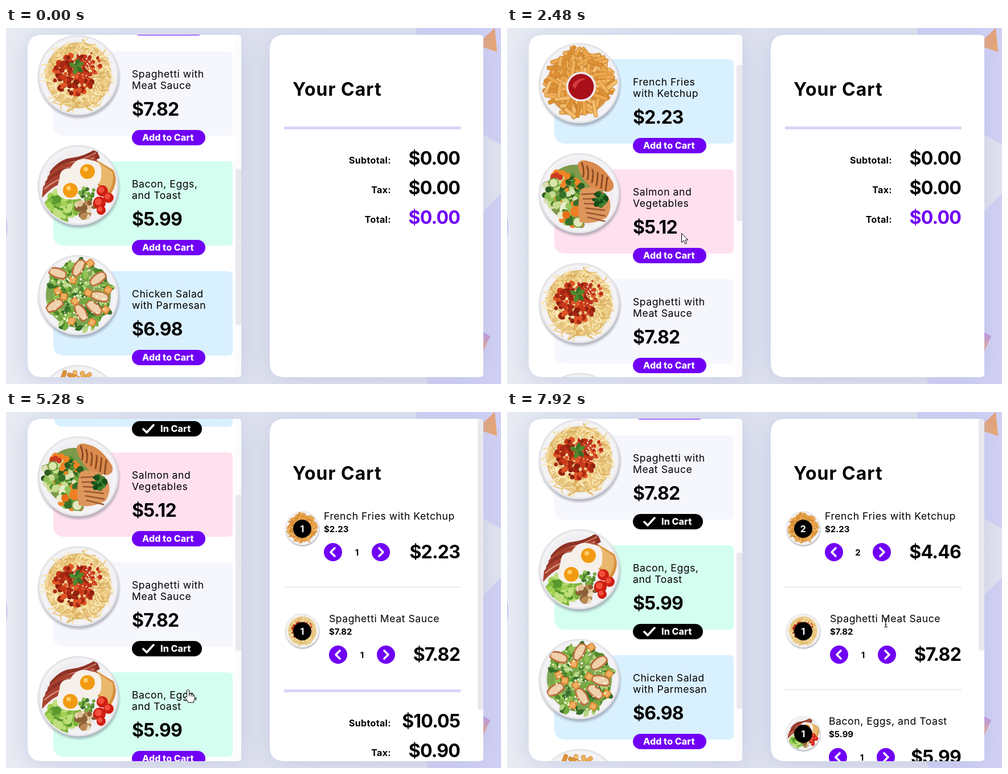
An HTML page for the animation above (8000 ms loop, 869 px wide and 625 px high).

```html
<!DOCTYPE html>
<html lang="en">
<head>
<meta charset="utf-8">
<title>Food cart</title>
<style>
  html, body { margin: 0; width: 100%; height: 100%; overflow: hidden; background: #e3e6f0; }
  svg { display: block; width: 869px; height: 625px; }
  text { font-family: Inter, Roboto, sans-serif; font-weight: 700; font-size: 16px; letter-spacing: .35px; }
  .name { font-weight: 400; font-size: 17.6px; letter-spacing: .55px; }
  .price { font-size: 32px; letter-spacing: -.8px; }
  .title { font-size: 32px; letter-spacing: 1px; }
  .button { font-weight: 800; letter-spacing: .1px; fill: #fff; }
  .small { font-size: 15px; letter-spacing: 0; }
  .end { text-anchor: end; }
  .mid { text-anchor: middle; }
  .panel { fill: #fff; filter: drop-shadow(0 4px 22px #b4bcdc99); }
  .tick { fill: none; stroke: #fff; stroke-width: 3.6; stroke-linecap: round; stroke-linejoin: round; }
</style>
</head>
<body>
<svg id="stage" viewBox="0 0 869 625"></svg>
<script>
const PURPLE = '#7000f5', LOOP = 8000, TICK = 40, PITCH = 193;
const stage = document.getElementById('stage');

let seed = 7;
const rnd = () => (seed = (seed * 16807) % 2147483647) / 2147483647;
const span = (a, b) => a + (b - a) * rnd();
const pick = list => list[Math.floor(rnd() * list.length)];
const many = (n, fn) => Array.from({ length: n }, (_, i) => fn(i)).join('');
const polar = r => {
  const a = span(0, 2 * Math.PI), d = r * Math.sqrt(rnd());
  return [d * Math.cos(a), d * Math.sin(a), a];
};

const circle = (x, y, r, fill, more = '') => `<circle cx="${x}" cy="${y}" r="${r}" fill="${fill}" ${more}/>`;
const rect = (x, y, w, h, r, fill, more = '') =>
  `<rect x="${x}" y="${y}" width="${w}" height="${h}" rx="${r}" fill="${fill}" ${more}/>`;
const path = (d, fill, more = '') => `<path d="${d}" fill="${fill}" ${more}/>`;
const line = (d, color, width) => path(d, 'none', `stroke="${color}" stroke-width="${width}"`);
const text = (x, y, cls, str, more = '') => `<text x="${x}" y="${y}" class="${cls}" ${more}>${str}</text>`;
const group = (x, y, body, more = '') => `<g transform="translate(${x} ${y})" ${more}>${body}</g>`;
const turn = (x, y, deg, body) => `<g transform="translate(${x} ${y}) rotate(${deg})">${body}</g>`;
const money = v => '$' + v.toFixed(2);

// Rounded box with large left and small right corners
const slab = (x, y, w, h, a, b) =>
  `M${x + a} ${y}h${w - a - b}q${b} 0 ${b} ${b}v${h - 2 * b}q0 ${b} ${-b} ${b}h${a + b - w}` +
  `q${-a} 0 ${-a} ${-a}v${2 * a - h}q0 ${-a} ${a} ${-a}z`;

const dots = (n, x, y, spread, r0, r1, colors) => many(n, () => {
  const [dx, dy] = polar(spread);
  return circle((x + dx).toFixed(1), (y + dy).toFixed(1), span(r0, r1).toFixed(1), pick(colors));
});
const sticks = n => many(n, () => {
  const [x, y, a] = polar(56);
  return turn(x, y, a * 57.3 + span(-70, 70), rect(-15, -3.4, span(24, 32), 6.8, 2,
    pick(['#eda84d', '#f3bd6d', '#dd9135', '#f0b25c']), 'stroke="#bf7424" stroke-width=".7"'));
});

const GREENS = ['#4f8a2c', '#74ab3e', '#93c257', '#37702a'];
const leaf = (x, y, deg, len, fill) =>
  turn(x, y, deg, path(`M0 0Q${len / 2} ${-len * .6} ${len} 0Q${len / 2} ${len * .5} 0 0z`, fill));

const foods = {
  fries: () => circle(0, 0, 56, '#d9933f') + sticks(120) + circle(3, 6, 26, '#eeeaf0') + circle(3, 6, 22.5, '#a90f19') +
    path('M-13 4Q-3 -12 13 -8Q-2 -5 -7 10z', '#d33a3d'),

  salmon: () => circle(-8, 0, 50, '#7d9a4c') +
    dots(120, -28, -4, 34, 3, 7, [...GREENS, '#2c5c22', '#c8dc8f', '#f08424', '#d9e0b4']) +
    dots(45, -10, 38, 23, 4, 8, [...GREENS, '#f2862b', '#e6edc8']) +
    dots(4, -38, -24, 15, 4, 6, ['#cc3a22']) +
    circle(-45, -18, 9, '#6f9e3f') + circle(-45, -18, 7, '#dbe6ad') +
    circle(-2, 51, 10, '#6f9e3f') + circle(-2, 51, 8, '#e0e9bd') +
    circle(-6, 32, 10, '#f07e24') + circle(-23, 38, 7, '#e96e17') +
    path('M-3 -50Q0 -64 28 -52Q46 -42 59 -19Q64 -6 50 -2L20 -10Q0 -28 -3 -50z', '#d98a4c') +
    many(6, i => line(`M${4 + i * 9} ${-54 + i * 6}Q${10 + i * 8} -38 ${6 + i * 8} ${-28 + i * 5}`, '#8d4a22', 3)) +
    path('M4 -8Q28 -16 50 5Q60 23 48 43Q22 56 1 51Q-6 20 4 -8z', '#dd965c') +
    many(6, i => line(`M${4 + i * 2} ${2 + i * 8}l${38 - i} ${-2 + i * 2}`, '#9a5730', 2.6)) +
    dots(34, 35, 10, 12, 2, 5, ['#286321', '#3b832e', '#164d19']),

  spaghetti: () => circle(0, 0, 58, '#e3c07a') + many(260, () => {
    const [x, y] = polar(57), v = () => span(-20, 20).toFixed(1);
    return line(`M${x.toFixed(1)} ${y.toFixed(1)}q${v()} ${v()} ${v()} ${v()}`,
      pick(['#edcb83', '#f6df9f', '#d9ae5c', '#fbebbd']), 2.2);
  }) + dots(150, -7, -2, 36, 2, 5.5, ['#c8391a', '#a92813', '#e05325', '#8d210f']) +
    dots(50, 17, -17, 24, 1.5, 4, ['#c8391a', '#b52d15', '#df5a2b']) +
    dots(40, 15, -23, 27, .7, 1.7, ['#faeee0']) +
    [205, 285, 330, 45, 110].map((a, i) => leaf(-3, -15, a, 15, GREENS[i % 2 * 3])).join(''),

  bacon: () => path('M29 -46L64 -25Q71 0 53 20L18 -17z', '#d8923f') + path('M34 -41L60 -23Q64 -2 52 12L24 -16z', '#e9b86d') +
    [0, 1, 2, 3].map(i => group(i * -4, i * 9, path('M-50 -24Q-33 -46 -12 -48T31 -64L38 -48Q10 -33 -11 -31T-52 -4z', i % 2 ? '#a8412f' : '#8f3225') +
      line('M-48 -20Q-30 -36 -11 -40T31 -57', '#d18d79', 2.4))).join('') +
    dots(120, -27, 36, 27, 3, 8, ['#7fb83d', '#a2d153', '#5a9a2d', '#bfdf7c']) +
    path('M-33 -12Q-33 -30 -14 -30Q-2 -52 22 -44Q43 -42 40 -20Q42 1 20 5Q13 27 -13 25Q-41 24 -37 3z', '#f6f0ea') +
    circle(16, -24, 13, '#f29b12') + circle(13, -28, 4, '#ffce66') +
    circle(-14, 9, 13, '#f29b12') + circle(-17, 5, 4, '#ffce66') +
    dots(30, 14, 41, 16, 3, 7, ['#b98a54', '#dfc296', '#8b6036', '#ead9ba']) +
    dots(24, 16, 15, 13, 2, 4, GREENS) +
    [[42, 10, 10], [37, 31, 11], [53, 22, 9], [40, 44, 8]].map(([x, y, r]) =>
      circle(x, y, r, '#cf1f14') + circle(x - 2, y - 2, r * .55, '#f2503b')).join(''),

  chicken: () => circle(0, 0, 57, '#7da551') + many(220, () => {
    const [x, y, a] = polar(57);
    return leaf(x, y, a * 57.3 + span(0, 180), span(9, 18), pick([...GREENS, '#b4d581']));
  }) + [[-36, -39, 20], [0, -48, -60], [34, -29, -35], [-42, 18, -30], [28, 22, 40], [5, 30, 60], [38, 2, 15]].map(([x, y, a]) =>
    turn(x, y, a, path('M-16 -4Q-5 -13 13 -7Q20 1 14 8Q-4 13 -16 6z', '#b8713f') +
      path('M-14 -2Q-4 -9 11 -5Q17 1 12 5Q-3 9 -14 4z', '#efd0ab'))).join('') +
    [[-10, -27], [21, -57], [-26, 2], [17, -5], [-12, 45], [52, -10], [-6, 10], [-36, -8], [24, 47], [48, 25]].map(([x, y]) =>
      turn(x, y, span(0, 90), rect(-6, -6, 13, 13, 2, '#d9832f') + rect(-4, -4, 9, 9, 1, '#efb063'))).join('') +
    dots(80, 0, 0, 55, .8, 2, ['#f6f2d9']),

  sides: () => sticks(70)
};

const menu = [
  ['fries', 'French Fries', 'with Ketchup', 2.23, '#d9f0ff'],
  ['salmon', 'Salmon and', 'Vegetables', 5.12, '#ffe0ef'],
  ['spaghetti', 'Spaghetti with', 'Meat Sauce', 7.82, '#f6f7fd'],
  ['bacon', 'Bacon, Eggs,', 'and Toast', 5.99, '#d4fff0'],
  ['chicken', 'Chicken Salad', 'with Parmesan', 6.98, '#d9f0ff']
];

// food, cart label, price, left shift, time added
const cart = [
  ['fries', 'French Fries with Ketchup', 2.23, 0, 3040],
  ['spaghetti', 'Spaghetti Meat Sauce', 7.82, 9, 4880],
  ['bacon', 'Bacon, Eggs, and Toast', 5.99, 7, 6880]
];
const SECOND_FRIES = 7520;

const use = id => `<use href="#${id}"/>`;
const plate = (id, draw) => `<g id="${id}">` + circle(1, 4, 74, 'url(#shade)') +
  circle(0, 0, 70.5, 'url(#china)') + `<g clip-path="url(#dish)">${draw()}</g></g>`;

const menuItem = ([id, a, b, price, color], i) => group(0, i * PITCH,
  path(slab(83, 0, 315, 148, 20, 8), color) + group(127, 42, use(id)) +
  text(221, 46, 'name', a) + text(221, 66, 'name', b) + text(221, 113, 'price', money(price)) +
  `<g id="add-${id}">` + rect(221, 138, 129, 27, 13.5, PURPLE) + text(239, 157, 'button', 'Add to Cart') + '</g>' +
  `<g id="in-${id}">` + rect(221, 138, 123, 27, 13.5, '#000') + path('M241 152l6 6 12-13', 'none', 'class="tick"') +
  text(271, 157, 'button', 'In Cart') + '</g>');

const arrow = (x, dir, id) => group(x, 246, circle(0, 0, 16, PURPLE, `id="${id}"`) +
  path(`M${-3 * dir} -7l${7 * dir} 7l${-7 * dir} 7`, 'none', 'class="tick"'));

const cartItem = ([id, label, price, dx], i) => group(0, i * 180,
  `<g transform="translate(520 204) scale(.425)">${use(id)}</g>` + circle(520, 205, 16, '#000') +
  text(520, 210.5, 'mid', 1, `fill="#fff" id="badge${i}"`) +
  text(558 + dx, 189, 'name', label) + text(558 + dx, 211, 'small', money(price)) +
  arrow(574 + dx, -1, 'less' + i) + text(616 + dx, 251.5, 'mid small', 1, `id="qty${i}"`) + arrow(658 + dx, 1, 'more' + i) +
  text(797, 257, 'price end', money(price), `id="sum${i}"`) +
  (i ? rect(488, 127, 310, 1, 0, '#d9d9dc') : ''), `id="row${i}"`);

const sumLine = (y, label, id, color) =>
  text(676, y - 2, 'end', label) + text(797, y, 'price end', '$0.00', `id="${id}" fill="${color}"`);

const pointer = {
  arrow: path('M.5 .5V16.5L4.3 13L7 19L9.6 17.8L7 12H12z', '#fff', 'stroke="#000"'),
  hand: path('M-1.5 1.5Q.5 -1 2.5 1.5V8Q5 6.5 6 8.7Q8.5 7.5 9.3 9.8Q11.8 9 12 12V17Q11.5 20 10 23H1Q-1 19 -5 14Q-5 11 -1.5 13.5z', '#fff', 'stroke="#000"') +
    line('M2.5 8v4M6 9v3.5M9.3 10v3', '#000', 1),
  beam: line('M-3 -7.5h2.5l.5 .5l.5 -.5h2.5M0 -7V7M-3 7.5h2.5l.5 -.5l.5 .5h2.5M-1.5 3h3', '#111', 1.2)
};

stage.innerHTML = `<defs>
  <linearGradient id="sky"><stop stop-color="#e9ecf3"/><stop offset=".5" stop-color="#dfe2ef"/><stop offset="1" stop-color="#e2e4ef"/></linearGradient>
  <linearGradient id="clay" x2="1" y2="1"><stop stop-color="#dd9c8e"/><stop offset="1" stop-color="#eaa563"/></linearGradient>
  <linearGradient id="dusk" x2="0" y2="1"><stop offset=".1" stop-color="#b78af0"/><stop offset=".5" stop-color="#e39c86"/></linearGradient>
  <radialGradient id="china"><stop offset=".8" stop-color="#efedf0"/><stop offset=".93" stop-color="#f5f4f6"/><stop offset="1" stop-color="#dedde2"/></radialGradient>
  <radialGradient id="shade"><stop offset=".9" stop-color="#777a88" stop-opacity=".6"/><stop offset="1" stop-color="#777a88" stop-opacity="0"/></radialGradient>
  <clipPath id="dish">${circle(0, 0, 67, '#000')}</clipPath>
  <clipPath id="left"><path d="${slab(38, 12, 375, 601, 26, 7)}"/></clipPath>
  <clipPath id="right"><path d="${slab(463, 12, 375, 601, 26, 7)}"/></clipPath>
  ${Object.entries(foods).map(([id, draw]) => plate(id, draw)).join('')}
</defs>` +
  rect(0, 0, 869, 625, 0, 'url(#sky)') +
  path('M720 0H869V205L800 165Q722 80 720 0zM869 290L780 382V540L736 613L741 625H869z', '#d1d0f5') +
  circle(-57, 350, 60, '#cfcff5') +
  path('M826 30L858 0L862 42z', 'url(#clay)') +
  path('M830 530L850 541L830 585z', 'url(#dusk)') +
  path(slab(38, 12, 375, 601, 26, 7), '#fff', 'class="panel"') +
  path(slab(463, 12, 375, 601, 26, 7), '#fff', 'class="panel"') +
  '<g clip-path="url(#left)">' + rect(401, 12, 12, 601, 0, '#fcfcfd') +
  `<g id="menu">${menu.map(menuItem).join('')}${group(127, 5 * PITCH + 42, use('sides'))}</g>` +
  rect(403, 0, 10, 274, 4, '#e9e9ed', 'id="thumb"') + '</g>' +
  '<g clip-path="url(#right)">' + text(503, 119, 'title', 'Your Cart') + cart.map(cartItem).join('') +
  '<g id="totals">' + rect(488, 173, 310, 5, 0, '#d8d4f8') +
  sumLine(240, 'Subtotal:', 'subtotal', '#000') + sumLine(292, 'Tax:', 'tax', '#000') + sumLine(344, 'Total:', 'total', PURPLE) + '</g>' +
  rect(828, 12, 10, 511, 4, '#e9e9ed', 'id="cartThumb"') + '</g>' +
  '<g id="cursor">' + Object.entries(pointer).map(([k, v]) => `<g id="${k}">${v}</g>`).join('') + '</g>';

const $ = id => document.getElementById(id);
const show = (id, on) => $(id).setAttribute('display', on ? 'inline' : 'none');
const move = (id, x, y) => $(id).setAttribute('transform', `translate(${Math.round(x)} ${Math.round(y)})`);
const unit = (t, a, b) => Math.min(1, Math.max(0, (t - a) / (b - a)));
const smooth = u => u * u * (3 - 2 * u);

// start, end, distance
const scrolls = [[1665, 2080, 400], [3750, 4080, -100], [5163, 5440, -200], [5582, 5806, -100]];

// time, x, y, shape from here on
const track = [
  [1000, 727, 606, 'arrow'], [1440, 331, 423, 'arrow'], [2400, 331, 423, 'arrow'], [2480, 306, 360, 'arrow'],
  [2800, 306, 212, 'hand'], [2880, 306, 206, 'hand'], [3280, 306, 206, 'hand'], [3400, 306, 222, 'arrow'],
  [3680, 306, 264, 'beam'], [3800, 306, 270, 'beam'], [3900, 306, 300, 'arrow'], [4080, 307, 381, 'arrow'],
  [4400, 317, 475, 'arrow'], [4760, 317, 475, 'arrow'], [4800, 319, 487, 'hand'], [6080, 319, 487, 'hand'],
  [6120, 319, 494, 'arrow'], [6240, 317, 532, 'arrow'], [6520, 291, 394, 'arrow'], [6640, 291, 394, 'arrow'],
  [6720, 291, 388, 'hand'], [6960, 291, 388, 'hand'], [7020, 330, 374, 'arrow'], [7300, 646, 252, 'hand'],
  [7360, 656, 247, 'hand'], [7720, 656, 247, 'hand'], [7790, 659, 285, 'arrow'], [7880, 664, 362, 'beam'],
  [7920, 665, 370, 'beam'], [8000, 665, 370, 'beam']
];

function drawCursor(t) {
  const next = track.findIndex(k => k[0] > t);
  show('cursor', next > 0);
  if (next < 1) return;
  const [t0, x0, y0, kind] = track[next - 1], [t1, x1, y1] = track[next];
  const u = unit(t, t0, t1);
  move('cursor', x0 + (x1 - x0) * u, y0 + (y1 - y0) * u);
  Object.keys(pointer).forEach(k => show(k, k === kind));
}

function draw(t) {
  const y = scrolls.reduce((sum, [a, b, d]) => sum + d * smooth(unit(t, a, b)), -345);
  move('menu', 0, y);
  $('thumb').setAttribute('y', Math.round(12 + (171.5 - y) * .455));

  let count = 0, subtotal = 0;
  cart.forEach(([, , price, , added], i) => {
    const on = t >= added, qty = i === 0 && t >= SECOND_FRIES ? 2 : 1;
    show('row' + i, on);
    $('badge' + i).textContent = $('qty' + i).textContent = qty;
    $('sum' + i).textContent = money(price * qty);
    if (on) { count++; subtotal += price * qty; }
  });
  menu.forEach(([id]) => {
    const held = cart.some(c => c[0] === id && t >= c[4]);
    show('add-' + id, !held);
    show('in-' + id, held);
  });

  const tax = subtotal * .09;
  $('subtotal').textContent = money(subtotal);
  $('tax').textContent = money(tax);
  $('total').textContent = money(subtotal + tax);
  move('totals', 0, count ? 180 * count - 46 : 0);
  show('cartThumb', count > 1);
  $('cartThumb').setAttribute('height', count > 2 ? 407 : 511);
  $('more0').setAttribute('fill', t >= 7300 && t < 7780 ? '#8f3dff' : PURPLE);
  drawCursor(t);
}

// The screen refreshes in steps of one tick; the small lead absorbs timer jitter
const start = performance.now();
function frame() {
  const t = (performance.now() - start + 4) % LOOP;
  draw(Math.floor(t / TICK) * TICK);
  requestAnimationFrame(frame);
}
frame();
</script>
</body>
</html>
```
